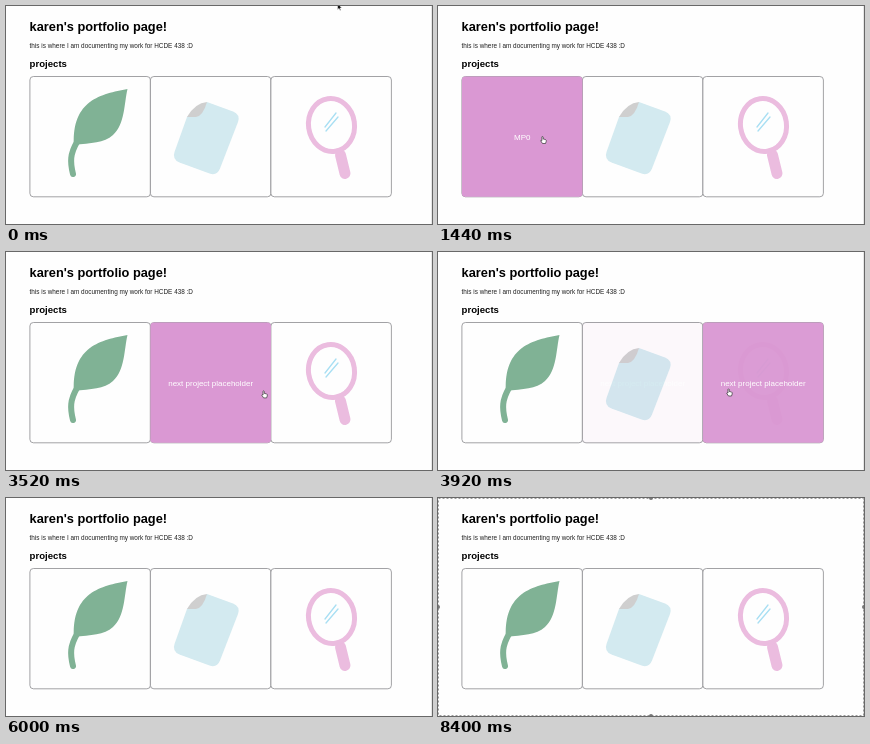
An HTML page for the animation above (8800 ms loop, 426 by 218 pixels).

```html
<!DOCTYPE html>
<html lang="en">
<head>
<meta charset="utf-8">
<title>Portfolio</title>
<style>
  html, body { margin: 0; width: 100%; height: 100%; overflow: hidden; background: #fefefe; }
  svg { display: block; width: 100%; height: 100%; font-family: "Liberation Sans", Arial, sans-serif; }
  .card { fill: #fefefe; stroke: #8c8c90; stroke-width: .8; }
  .veil rect { fill: #da98d3; }
  .veil text { fill: #fff; font-size: 8px; text-anchor: middle; }
  .round { fill: none; stroke-linecap: round; }
</style>
</head>
<body>
<svg viewBox="0 0 426 218">
  <text x="23.6" y="24.5" font-size="12.8" font-weight="bold">karen's portfolio page!</text>
  <text x="23.6" y="42.4" font-size="6.4" fill="#222">this is where I am documenting my work for HCDE 438 :D</text>
  <text x="23.6" y="60.6" font-size="9.6" font-weight="bold">projects</text>
  <path d="M425.5 0V218" stroke="#e6e6e6"/>

  <g id="cards"></g>

  <g id="leaf">
    <path fill="#80b295" d="M121.5 83C95 88 66 94 68 139C85 137 98 137 107 129C119 118 118 98 121.5 83Z"/>
    <path class="round" stroke="#80b295" stroke-width="6" d="M71 136C64 148 64 156 67 168"/>
  </g>
  <g id="paper">
    <path fill="#d3eaf0" d="M201 96L227 105.500Q234.500 108.500 232 116L214 162.500Q211 170 203.500 167.500L173.500 156.500Q166 153.500 168.500 146L181 111Z"/>
    <path fill="#cfcfcf" d="M201 96Q189 97 181 111H190Q197 110 201 96Z"/>
  </g>
  <g id="mirror">
    <path class="round" stroke="#ebbcdf" stroke-width="11" d="M334.500 149L339 167.500"/>
    <ellipse cx="325.500" cy="119" rx="23" ry="26.500" transform="rotate(-8 325.500 119)" fill="#fefefe" stroke="#ebbcdf" stroke-width="5"/>
    <path class="round" stroke="#a8dff3" stroke-width="1.300" d="M319 121L330 107M320 125L332 111"/>
  </g>

  <g id="veils"></g>

  <g id="selection" fill="#777">
    <rect x=".5" y=".5" width="425" height="217" fill="none" stroke="#999" stroke-dasharray="2 2"/>
    <circle cx="213" cy="0" r="2"/><circle cx="213" cy="218" r="2"/>
    <circle cx="0" cy="109" r="2"/><circle cx="426" cy="109" r="2"/>
  </g>

  <g id="cursor">
    <path id="arrow" d="M0 0V6.200L1.500 4.900L2.500 7.100L3.500 6.700L2.500 4.500H4.400Z" fill="#111" stroke="#fff" stroke-width=".5"/>
    <path id="hand" d="M-1.600 -3.200Q-.800 -4 -.300 -3V-1L2 -.500Q3 0 2.700 1.500L2 3.500H-1L-2.800 .800Q-2.600 -.200 -1.500 .500Z" fill="#fff" stroke="#333" stroke-width=".7"/>
  </g>
</svg>
<script>
const LOOP = 8800, STEP = 80, FADE = 500, LEAVE = 5150;
const $ = id => document.getElementById(id);

const cards = [
  { x: 23.9, label: "MP0", enter: 950, leave: 2420 },
  { x: 144.4, label: "next project placeholder", enter: 2420, leave: 3555 },
  { x: 264.9, label: "next project placeholder", enter: 3555, leave: LEAVE }
];

// time, x, y of the pointer
const path = [
  [0, 331.5, -2.5], [160, 322, 2], [560, 215, 36], [950, 118, 71], [1280, 105, 132],
  [1440, 105.5, 134], [2000, 106, 134], [2420, 145, 146], [2560, 168, 147.5],
  [2880, 184, 146], [3200, 200, 146], [3555, 265, 142], [3920, 291.5, 140.5],
  [4320, 293, 140], [5040, 293, 140], [LEAVE, 330, 75]
];

const box = (x, cls) => `<rect class="${cls}" x="${x}" y="70.5" width="120.5" height="120.3" rx="3.5"/>`;
$("cards").innerHTML = cards.map(c => box(c.x, "card")).join("");
$("veils").innerHTML = cards.map(c =>
  `<g class="veil">${box(c.x, "")}<text x="${c.x + 60.3}" y="133.7">${c.label}</text></g>`).join("");
const veils = document.querySelectorAll(".veil");

// CSS "ease": cubic-bezier(.25, .1, .25, 1)
function ease(p) {
  if (p <= 0) return 0;
  if (p >= 1) return 1;
  const bez = (a, b, s) => 3 * a * s * (1 - s) ** 2 + 3 * b * s * s * (1 - s) + s ** 3;
  let lo = 0, hi = 1;
  for (let i = 0; i < 20; i++) {
    const mid = (lo + hi) / 2;
    if (bez(.25, .25, mid) < p) lo = mid; else hi = mid;
  }
  return bez(.1, 1, lo);
}

function pointerAt(t) {
  const i = path.findIndex(k => k[0] > t);
  const [t0, x0, y0] = path[i - 1], [t1, x1, y1] = path[i];
  const p = (t - t0) / (t1 - t0);
  return [x0 + (x1 - x0) * p, y0 + (y1 - y0) * p];
}

const show = (id, on) => $(id).setAttribute("visibility", on ? "visible" : "hidden");

function draw(t) {
  cards.forEach((c, i) => {
    const alpha = ease((t - c.enter) / FADE) - ease((t - c.leave) / FADE);
    veils[i].setAttribute("opacity", alpha);
  });
  const active = t < LEAVE, over = t >= cards[0].enter;
  show("arrow", active && !over);
  show("hand", active && over);
  if (active) $("cursor").setAttribute("transform", `translate(${pointerAt(t)})`);
  show("selection", t >= 8400);
}

const start = performance.now();
function tick() {
  const t = (performance.now() - start) % LOOP;
  draw(Math.floor(t / STEP) * STEP);
  requestAnimationFrame(tick);
}
tick();
</script>
</body>
</html>
```
